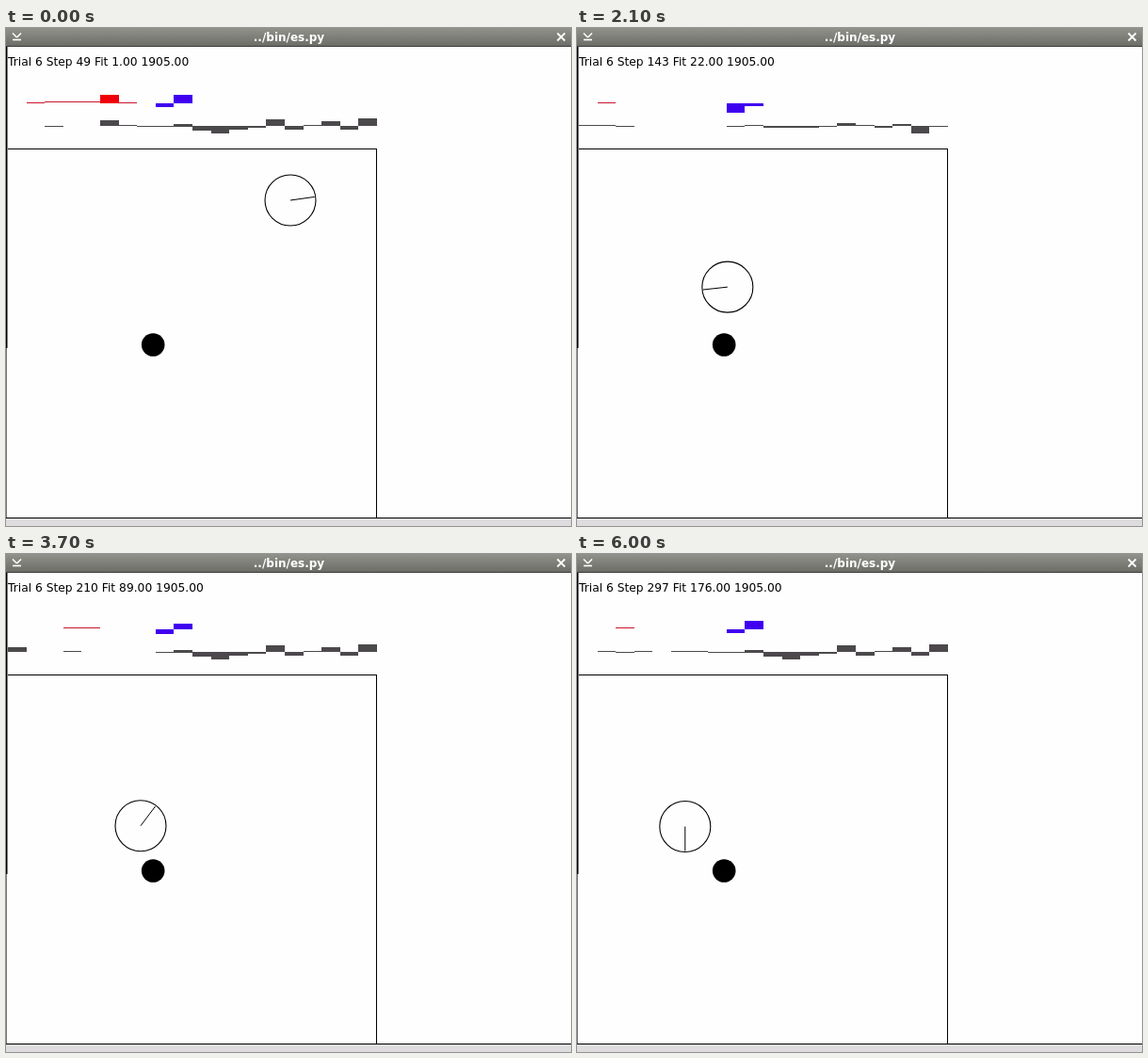
Write an HTML page with a canvas that moves like this. It is 600 px wide and 529 px high and loops after 6100 ms.

```html
<!DOCTYPE html>
<html lang="en">
<head>
<meta charset="utf-8">
<title>es.py</title>
<style>
html, body { margin: 0; width: 100%; height: 100%; overflow: hidden; background: #fff; }
canvas { display: block; }
</style>
</head>
<body>
<canvas id="stage" width="600" height="529"></canvas>
<script>
const ctx = document.getElementById('stage').getContext('2d');
const TICK = 100, TICKS = 61, CELL = 19.6;
const RED_BASE = 79.5, GREY_BASE = 104;
const BALL = { x: 156.2, y: 336.5, r: 12.3 };
const ROBOT_R = 27;

// tick, step, x, y, heading (degrees, counter-clockwise), left motor, right motor, wobble radius, network state
const KEYS = [
  [0, 49, 302, 183, 8, -4, 9, 4, 0],
  [9, 91, 344, 234.5, 639, -8.5, 11, 3, 1],
  [11, 100, 338, 233, 725, -13, -5, 0, 1.5],
  [17, 126, 172.3, 263.5, 787, -13.5, -8, 0, 2],
  [26, 164, 144.3, 289.7, 1055.4, -5, 4, 0, 3],
  [37, 210, 143, 288.7, 1493, -4.5, 6, 0, 3],
  [52, 264, 124.7, 289.8, 2074, -4.5, 8, 3, 3],
  [60, 297, 114.8, 289.5, 2430, -4, 9, 4, 3]
];

// hidden and output neurons for each network state
const STEADY = [-1, 2.5, -5, -7.5, -3.5, -2, 7, -4, 1, 5, -4, 8];
const NETWORK = [
  STEADY,
  [3, 0, 3, 0, -2, -1, 4, -3, 0, 0, -8, 10.5],
  [0, 0, 0, 3, 0, 2, -1, 5, -4, -1, -11, -8],
  STEADY
];

// tick, red flicker bits, grey flicker bits
const FLICKER = [
  [0, 126, 196], [9, 112, 6], [17, 56, 112], [26, 126, 187],
  [37, 24, 8], [52, 110, 25], [60, 4, 238]
];
const SENSOR_ANGLES = [-90, -50, -10, 10, 50, 90, 150, -150];

const mix = (a, b, t) => a + (b - a) * t;
const rad = deg => deg * Math.PI / 180;

function wobble(heading, r) {
  return [r * Math.sin(rad(heading)), r * Math.cos(rad(heading))];
}

function poseAt(tick) {
  let i = 0;
  while (i < KEYS.length - 2 && KEYS[i + 1][0] <= tick) i++;
  const a = KEYS[i], b = KEYS[i + 1];
  const t = (tick - a[0]) / (b[0] - a[0]);
  const [, step, , , heading, left, right, r, state] = a.map((v, k) => mix(v, b[k], t));
  const [ax, ay] = wobble(a[4], a[7]);
  const [bx, by] = wobble(b[4], b[7]);
  const [wx, wy] = wobble(heading, r);
  return {
    step: Math.round(step), heading, left, right, state,
    x: mix(a[2] - ax, b[2] - bx, t) + wx,
    y: mix(a[3] - ay, b[3] - by, t) + wy
  };
}

// Proximity reading of one sensor for nearby walls and the ball
function sense(p, angle) {
  const dx = BALL.x - p.x, dy = BALL.y - p.y;
  const ballGap = Math.hypot(dx, dy) - ROBOT_R - BALL.r;
  const wall = distance => Math.min(20, 9 + (28 + ROBOT_R - distance) * 1.67);
  const obstacles = [
    [Math.atan2(-dy, dx) * 180 / Math.PI, (14 - ballGap) * 2],
    [0, wall(393 - p.x)], [90, wall(p.y - 128)],
    [180, wall(p.x - 2)], [270, wall(520 - p.y)]
  ];
  return Math.max(0, ...obstacles.map(([bearing, strength]) => {
    const diff = Math.abs(((bearing - p.heading - angle) % 360 + 900) % 360 - 180);
    return strength * Math.min(1, Math.max(0, (20 - diff) / 1.5));
  }));
}

function rect(color, x, y, w, h) {
  ctx.fillStyle = color;
  ctx.fillRect(x, y, w, h);
}

function bar(cell, base, value, color) {
  const x = Math.round(2 + cell * CELL), end = Math.round(2 + (cell + 1) * CELL);
  const y = Math.round(base - Math.max(value, 0));
  rect(color, x, y, end - x, Math.max(1, Math.round(Math.abs(value))));
}

function line(x1, y1, x2, y2, color = '#000', width = 1) {
  ctx.strokeStyle = color;
  ctx.lineWidth = width;
  ctx.beginPath();
  ctx.moveTo(x1, y1);
  ctx.lineTo(x2, y2);
  ctx.stroke();
}

function text(str, x, y, font, color, align) {
  ctx.font = font + ' "DejaVu Sans", sans-serif';
  ctx.fillStyle = color;
  ctx.textAlign = align;
  ctx.fillText(str, x, y);
}

function drawWindow() {
  rect('#fefefe', 0, 0, 600, 529);
  const shade = ctx.createLinearGradient(0, 0, 0, 20);
  shade.addColorStop(0, '#92928c');
  shade.addColorStop(1, '#6b6b66');
  rect(shade, 0, 0, 600, 20);
  rect('#3c3c3a', 0, 19, 600, 1);
  text('../bin/es.py', 300.5, 14, 'bold 12px', '#fff', 'center');
  line(7, 5.5, 11.5, 10, '#fff', 1.6);
  line(16, 5.5, 11.5, 10, '#fff', 1.6);
  line(7, 12.5, 16, 12.5, '#fff', 1.6);
  line(585.5, 5.5, 593.5, 13.5, '#fff', 1.8);
  line(593.5, 5.5, 585.5, 13.5, '#fff', 1.8);
  rect('#dedcde', 0, 521, 600, 8);
  rect('#000', 0, 520, 600, 1);
  rect('#777', 0, 340, 1, 180);
  rect('#000', 0, 20, 1.5, 320);
  rect('#000', 2, 128, 392, 1);
  rect('#000', 393, 128, 1, 392);
}

function drawBars(p, tick) {
  const [keyTick, redBits, greyBits] = FLICKER.reduce((best, f) =>
    Math.abs(f[0] - tick) < Math.abs(best[0] - tick) ? f : best);
  const lit = (bits, c) => bits >> ((c + 3 * Math.abs(tick - keyTick)) % 8) & 1;
  SENSOR_ANGLES.forEach((angle, c) => {
    const red = sense(p, angle);
    if (red > 1) bar(c, RED_BASE, red, '#f00008');
    else if (c > 0 && c < 7 && lit(redBits, c)) bar(c, c % 5 === 1 ? 79 : 78, 0, '#c8142a');
    const grey = 0.72 * sense(p, angle - 20);
    if (grey > 1) bar(c, GREY_BASE, grey, '#4c494c');
    else if (lit(greyBits, c)) bar(c, c % 5 === 2 ? 104 : 103, 0, '#4c494c');
  });
  bar(8, RED_BASE, p.left, '#4000f0');
  bar(9, RED_BASE, p.right, '#4000f0');
  const i = Math.min(2, Math.floor(p.state));
  NETWORK[i].forEach((v, k) => {
    const value = mix(v, NETWORK[i + 1][k], p.state - i);
    bar(8 + k, GREY_BASE, value, '#4c494c');
  });
}

function drawArena(p) {
  ctx.fillStyle = '#000';
  ctx.beginPath();
  ctx.arc(BALL.x, BALL.y, BALL.r, 0, 2 * Math.PI);
  ctx.fill();
  ctx.strokeStyle = '#000';
  ctx.lineWidth = 1.1;
  ctx.beginPath();
  ctx.arc(p.x, p.y, ROBOT_R, 0, 2 * Math.PI);
  ctx.stroke();
  const a = rad(p.heading);
  line(p.x, p.y, p.x + 26 * Math.cos(a), p.y - 26 * Math.sin(a));
}

function draw(now) {
  const tick = Math.floor(now / TICK) % TICKS;
  const p = poseAt(tick);
  const fit = Math.max(1, p.step - 121).toFixed(2);
  drawWindow();
  text(`Trial 6 Step ${p.step} Fit ${fit} 1905.00`, 2, 40, '12.27px', '#000', 'left');
  drawBars(p, tick);
  drawArena(p);
}

let start;
function loop(now) {
  start ??= now;
  draw(Math.max(0, now - start));
  requestAnimationFrame(loop);
}
draw(0);
requestAnimationFrame(loop);
</script>
</body>
</html>
```
